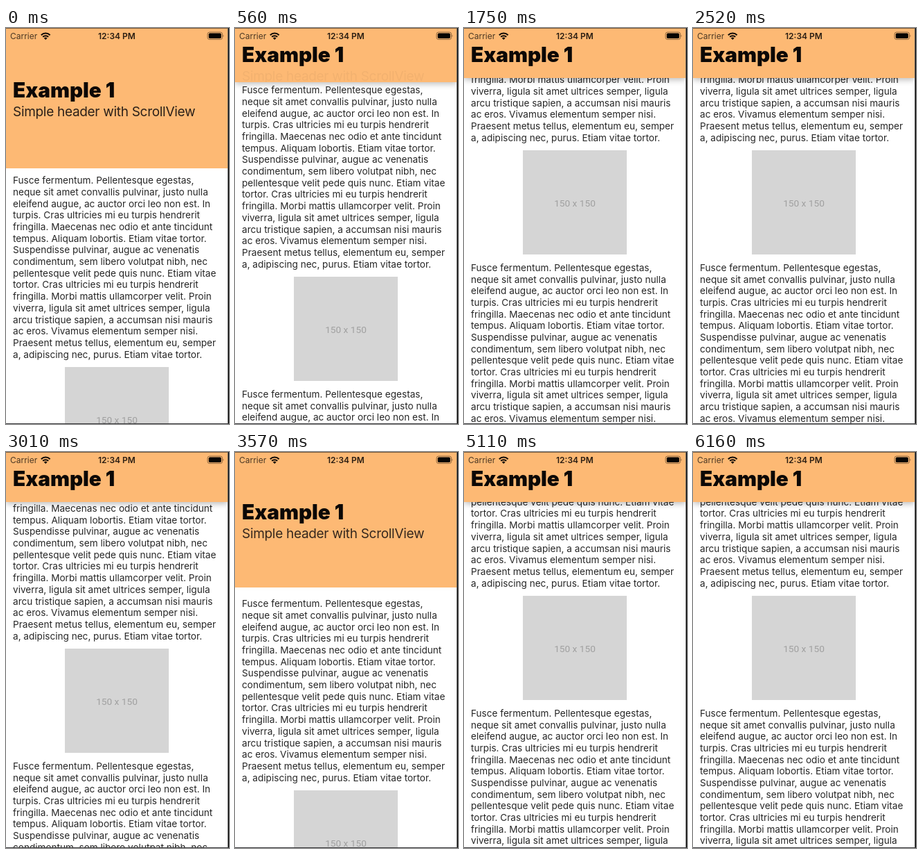
Write an HTML page that moves like this. It is 322x570 px and loops after 6.23 s.

```html
<!DOCTYPE html>
<html lang="en">
<head>
<meta charset="utf-8">
<title>Collapsing header</title>
<style>
  html, body { margin: 0; width: 100%; height: 100%; overflow: hidden; background: #fff; }
  #stage { position: relative; width: 322px; height: 570px; overflow: hidden; background: #fff;
    font-family: Inter, Roboto, sans-serif; color: #262626; }
  #stage div, #stage svg { position: absolute; white-space: pre; }
  #page { left: 0; top: 0; width: 320px; will-change: transform; }
  .copy { left: 10px; font-size: 13.6px; line-height: 16.69px; }
  .box { left: 85px; top: 488px; width: 150px; height: 150px; background: #d5d5d5; color: #a0a0a0;
    font: 400 13.7px/153px Roboto, sans-serif; text-align: center; }
  #head { left: 0; top: 0; width: 320px; background: #fdb974; overflow: hidden; }
  #title { left: 10px; top: 72px; font-size: 29.7px; font-weight: 900; line-height: 35px; color: #0c0806; }
  #sub { left: 10px; top: 108px; font-size: 19px; line-height: 25px; letter-spacing: -.3px; color: #2b2019; }
  .status { top: 4px; font-size: 12px; line-height: 16px; }
  .top { left: 0; top: 0; width: 320px; height: 1px; background: #7a5a3a; }
  .right { left: 320px; top: 0; width: 1px; height: 570px; background: #555; border-right: 1px solid #111; }
  .bottom { left: 0; top: 569px; width: 322px; height: 1px; background: #3a3a3c; }
</style>
</head>
<body>
<div id="stage">
  <div id="page">
    <div class="copy" style="top:211.3px"></div>
    <div class="box">150 x 150</div>
    <div class="copy" style="top:648.9px"></div>
  </div>
  <div id="head">
    <div id="title">Example 1</div>
    <div id="sub">Simple header with ScrollView</div>
  </div>
  <div class="status" style="left:6px;color:#4b3824">Carrier</div>
  <div class="status" style="left:133px;font-weight:600;color:#2a1d12">12:34 PM</div>
  <svg width="322" height="24" style="left:0;top:0">
    <g fill="none" stroke="#0d0906" stroke-width="2">
      <path d="M50.8 10.2a9.2 9.2 0 0 1 12.8 0"/>
      <path d="M53.2 12.8a5.7 5.7 0 0 1 8 0"/>
    </g>
    <path d="M54.8 14.6a3.4 3.4 0 0 1 4.8 0L57.2 17z" fill="#0d0906"/>
    <rect x="291" y="6" width="21.5" height="10.5" rx="3" fill="none" stroke="#5f4529" stroke-opacity=".7"/>
    <rect x="292.7" y="7.6" width="18.1" height="7.3" rx="1.6" fill="#050302"/>
    <path d="M313.6 9.6q1.6 1.6 0 3.3z" fill="#5f4529"/>
  </svg>
  <div class="top"></div>
  <div class="right"></div>
  <div class="bottom"></div>
</div>
<script>
const LOOP = 6230, STEP = 70, LAG = 16;
const SHRINK = 130, FULL = 202, MAX_RISE = 51;

const copy = `Fusce fermentum. Pellentesque egestas,
neque sit amet convallis pulvinar, justo nulla
eleifend augue, ac auctor orci leo non est. In
turpis. Cras ultricies mi eu turpis hendrerit
fringilla. Maecenas nec odio et ante tincidunt
tempus. Aliquam lobortis. Etiam vitae tortor.
Suspendisse pulvinar, augue ac venenatis
condimentum, sem libero volutpat nibh, nec
pellentesque velit pede quis nunc. Etiam vitae
tortor. Cras ultricies mi eu turpis hendrerit
fringilla. Morbi mattis ullamcorper velit. Proin
viverra, ligula sit amet ultrices semper, ligula
arcu tristique sapien, a accumsan nisi mauris
ac eros. Vivamus elementum semper nisi.
Praesent metus tellus, elementum eu, semper
a, adipiscing nec, purus. Etiam vitae tortor.`;
document.querySelectorAll('.copy').forEach(el => el.textContent = copy);

// [time, scroll offset]; negative offsets are the bounce at the top
const keys = [
  [0, 0], [70, 2], [350, 60], [630, 155], [910, 255], [1190, 301], [1610, 312],
  [2520, 312], [2800, 262], [3080, 184], [3360, 88], [3570, 1], [3620, -14], [3900, 0],
  [4090, 0], [4410, 76], [4690, 205], [5040, 281], [LOOP, 281]
];
const slope = i => (keys[i + 1][1] - keys[i][1]) / (keys[i + 1][0] - keys[i][0]);

// Monotone tangents: flat at turning points
function tangent(i) {
  if (i === 0 || i === keys.length - 1) return 0;
  const a = slope(i - 1), b = slope(i);
  return a * b > 0 ? 2 * a * b / (a + b) : 0;
}

function scrollAt(t) {
  if (t <= 0) return 0;
  let i = 0;
  while (i < keys.length - 2 && t >= keys[i + 1][0]) i++;
  const [t0, a] = keys[i], [t1, b] = keys[i + 1];
  const d = t1 - t0, u = (t - t0) / d, v = 1 - u;
  return a * v * v * (1 + 2 * u) + b * u * u * (3 - 2 * u)
    + d * u * v * (tangent(i) * v - tangent(i + 1) * u);
}

const el = id => document.getElementById(id);
const page = el('page'), head = el('head'), title = el('title'), sub = el('sub');
const shiftY = (node, y) => node.style.transform = `translateY(${y}px)`;

function draw(t) {
  // The header follows the scroll slightly late
  const h = Math.max(0, Math.min(SHRINK, scrollAt(t - LAG)));
  const rise = Math.round(Math.min(MAX_RISE, h * .47));
  shiftY(page, -Math.round(scrollAt(t)));
  head.style.height = Math.round(FULL - h) + 'px';
  head.style.boxShadow = `0 3px 8px rgba(0,0,0,${.25 * h / SHRINK})`;
  shiftY(title, -rise);
  shiftY(sub, -rise);
  sub.style.opacity = 1 - h / SHRINK;
}

const start = performance.now();
function tick() {
  const t = (performance.now() - start) % LOOP;
  draw(Math.floor(t / STEP) * STEP);
  requestAnimationFrame(tick);
}
draw(0);
requestAnimationFrame(tick);
</script>
</body>
</html>
```
